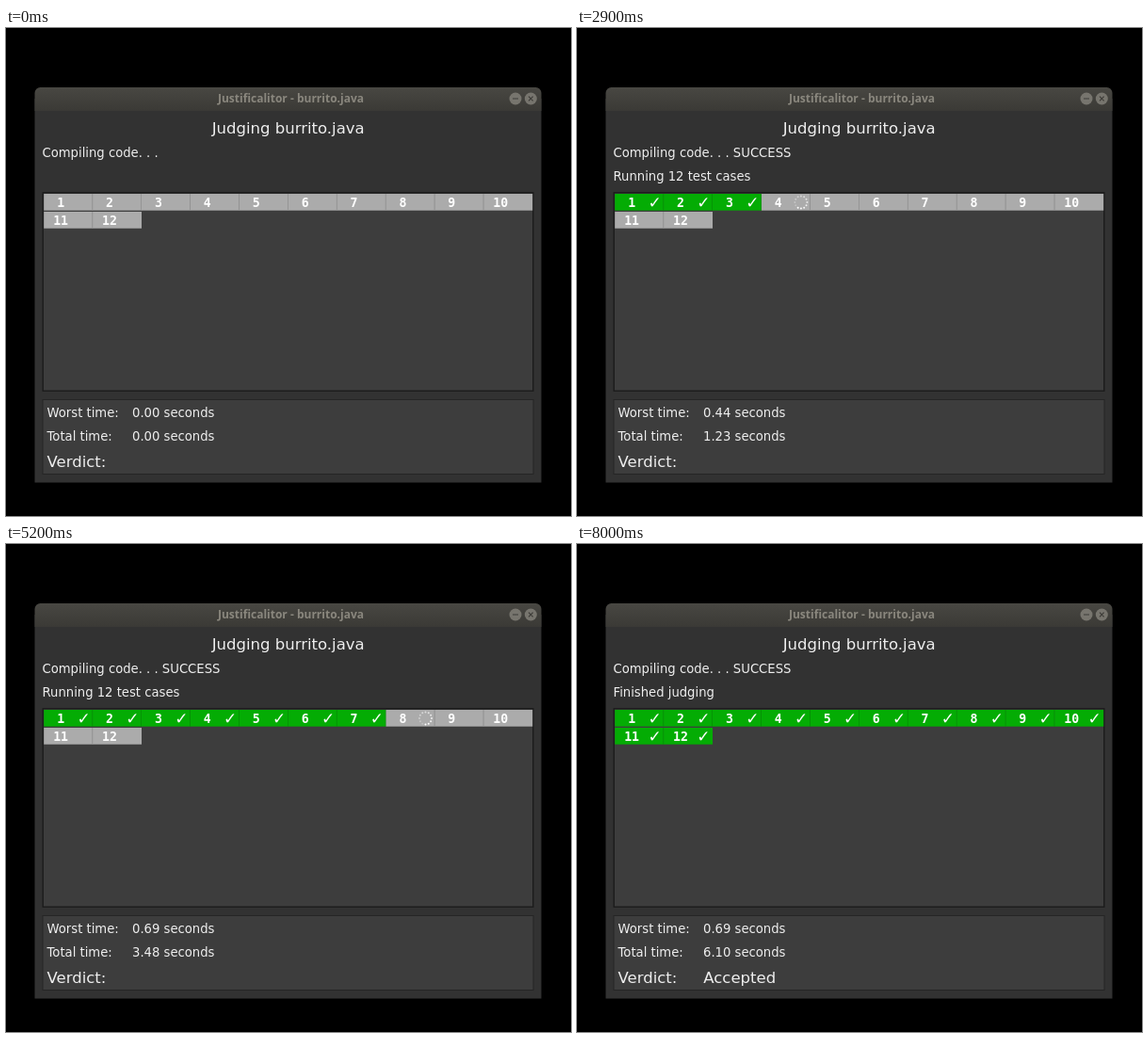
Write an HTML page with a canvas that moves like this. It is 600 by 518 pixels and loops after 10 s.

```html
<!DOCTYPE html>
<html lang="en">
<head>
<meta charset="utf-8">
<title>Judging burrito.java</title>
<style>
  html, body { margin: 0; width: 100%; height: 100%; overflow: hidden; background: #000; }
  canvas { display: block; }
</style>
</head>
<body>
<canvas id="stage" width="600" height="518"></canvas>
<script>
const ctx = document.getElementById('stage').getContext('2d');
const LOOP = 10000, STEP = 100;
const START = 1230, OVERHEAD = 15; // ms before the first test, ms between tests
const runTimes = [0.40, 0.44, 0.39, 0.69, 0.46, 0.47, 0.63, 0.63, 0.63, 0.55, 0.41, 0.40];
const CELL = 51.9, ROW = 19, COLUMNS = 10;
const SANS = '"DejaVu Sans", sans-serif', MONO = '"DejaVu Sans Mono", monospace';

function rect(x, y, w, h, color) {
  ctx.fillStyle = color;
  ctx.fillRect(x, y, w, h);
}

function disc(x, y, r, color) {
  ctx.fillStyle = color;
  ctx.beginPath();
  ctx.arc(x, y, r, 0, Math.PI * 2);
  ctx.fill();
}

function text(str, x, y, font = '13.2px ' + SANS, align = 'left', color = '#eee') {
  ctx.font = font;
  ctx.textAlign = align;
  ctx.fillStyle = color;
  ctx.fillText(str, x, y);
}

function panel(x, y, w, h, border, edge) {
  rect(x, y, w, h, edge);
  rect(x + border, y + border, w - 2 * border, h - 2 * border, '#3d3d3d');
}

function drawWindow() {
  rect(0, 0, 600, 518, '#000');
  rect(30.5, 75, 538, 407.5, '#323232');
  const bar = ctx.createLinearGradient(0, 63, 0, 88);
  bar.addColorStop(0, '#484742');
  bar.addColorStop(1, '#3b3a36');
  ctx.fillStyle = bar;
  ctx.beginPath();
  ctx.roundRect(30.5, 63, 538, 25, [6, 6, 0, 0]);
  ctx.fill();
  text('Justificalitor - burrito.java', 380, 79, 'bold 12px "Noto Sans", sans-serif', 'right', '#8a877e');

  disc(541, 75, 6.5, '#77756e');
  disc(557.3, 75, 6.5, '#77756e');
  ctx.strokeStyle = '#3d3c38';
  ctx.lineWidth = 1.2;
  ctx.stroke(new Path2D('M538 75h6M555 72.7l4.6 4.6m0-4.6l-4.6 4.6'));

  panel(38.5, 174, 522, 212, 1.5, '#1d1d1d');
  panel(38.5, 394, 522, 80, 1, '#252525');
}

function drawSpinner(x, y, time) {
  const dots = 12, head = Math.floor(time / STEP);
  for (let i = 0; i < dots; i++) {
    const angle = (i + head) / dots * Math.PI * 2;
    disc(x + 6.5 * Math.cos(angle), y + 6.5 * Math.sin(angle), 1, `rgba(255,255,255,${0.25 + 0.75 * i / (dots - 1)})`);
  }
}

function drawCell(i, done, running, time) {
  const x = 40.2 + (i % COLUMNS) * CELL, y = 176 + Math.floor(i / COLUMNS) * ROW;
  rect(x, y, CELL, 17.7, done ? '#04ac04' : '#ababab');
  if (i % COLUMNS < COLUMNS - 1 && i < runTimes.length - 1) {
    rect(x + CELL - 0.7, y, 1, 17.7, done ? '#078a07' : '#8c8c8c');
  }
  text(i + 1, x + 17.9, y + 14, 'bold 13.2px ' + MONO, 'center', '#fff');
  if (done) text('✓', x + 42.3, y + 14.6, '17px ' + SANS, 'center', '#fff');
  if (running) drawSpinner(x + 42, y + 9, time);
}

function countFinished(time) {
  let end = START, count = 0;
  for (const seconds of runTimes) {
    end += seconds * 1000 + OVERHEAD;
    if (time < end) break;
    count++;
  }
  return count;
}

function draw(time) {
  const started = time >= START, finished = countFinished(time);
  const allDone = finished === runTimes.length;
  const past = runTimes.slice(0, finished);
  const worst = Math.max(0, ...past);
  const total = past.reduce((sum, s) => sum + s, 0);

  drawWindow();
  text('Judging burrito.java', 299.7, 112, '16.5px ' + SANS, 'center');
  text('Compiling code. . .' + (started ? ' SUCCESS' : ''), 38.5, 137.2);
  if (started) text(allDone ? 'Finished judging' : 'Running 12 test cases', 38.5, 162);
  runTimes.forEach((_, i) => drawCell(i, i < finished, started && i === finished, time));

  text('Worst time:', 43.5, 412.8);
  text(worst.toFixed(2) + ' seconds', 134, 412.8);
  text('Total time:', 43.5, 437.6);
  text(total.toFixed(2) + ' seconds', 134, 437.6);
  text('Verdict:', 43.5, 465.6, '16.5px ' + SANS);
  if (allDone) text('Accepted', 134.3, 465.6, '16.5px ' + SANS);
}

function frame() {
  const time = performance.now() % LOOP;
  draw(Math.floor(time / STEP) * STEP);
  requestAnimationFrame(frame);
}
frame();
</script>
</body>
</html>
```
